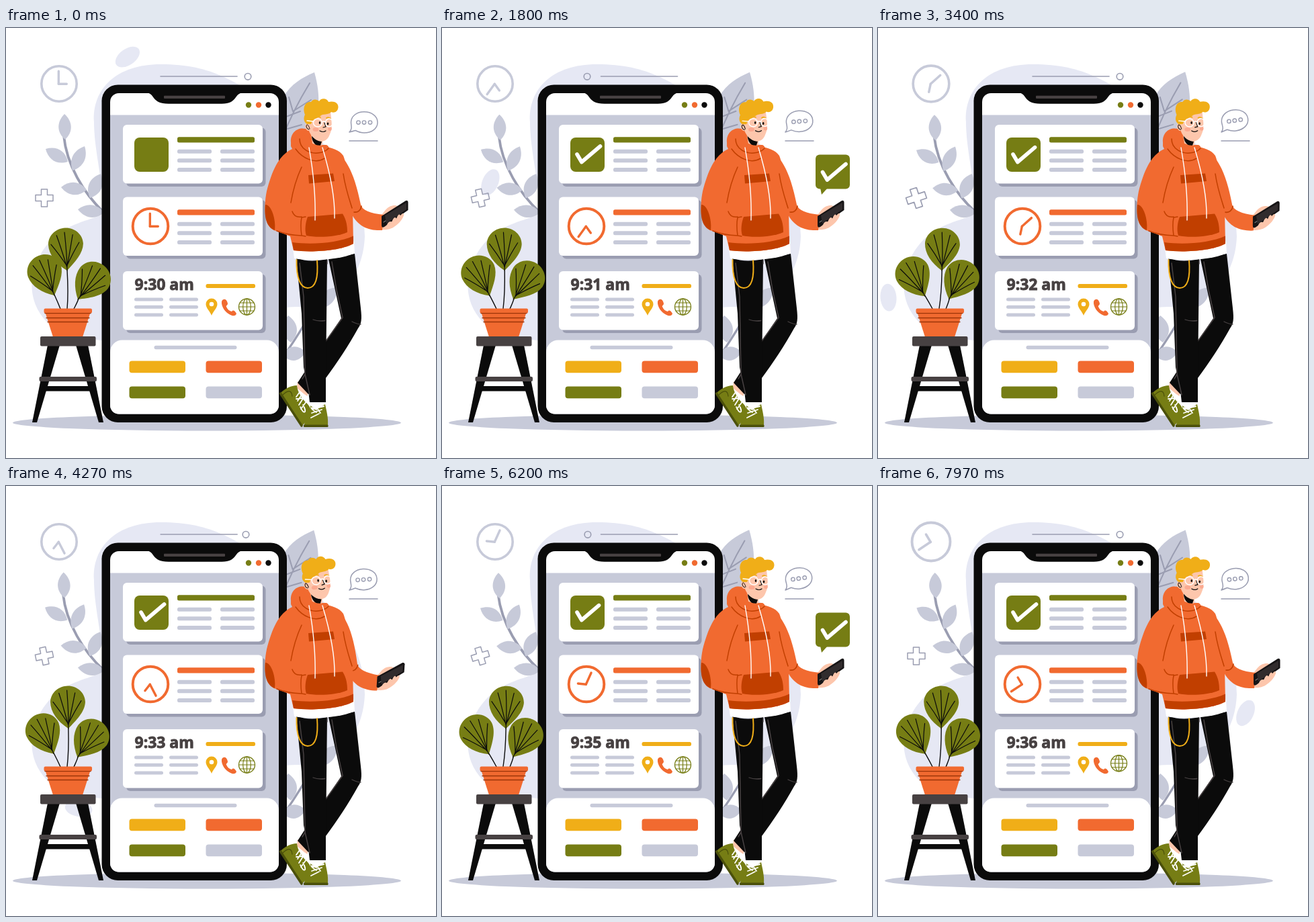
Animation, 640 px wide and 640 px high, one loop 8000 ms. Source, as an HTML page with a canvas:

```html
<!DOCTYPE html>
<html lang="en">
<head>
<meta charset="utf-8">
<title>Appointment app</title>
<style>
html, body { margin: 0; width: 100%; height: 100%; overflow: hidden; background: #fff; }
canvas { display: block; width: 640px; height: 640px; }
</style>
</head>
<body>
<canvas id="stage"></canvas>
<script>
const canvas = document.getElementById('stage');
const ctx = canvas.getContext('2d');
const dpr = window.devicePixelRatio || 1;
canvas.width = canvas.height = 640 * dpr;

const PALE = '#e6e8f4', LILAC = '#c7cad9', STEEL = '#9a9db1', BLACK = '#0b0b0b', GRAY = '#474142',
  OLIVE = '#767d14', MOSS = '#4b500a', ORANGE = '#f16a30', RUST = '#c13f00', YELLOW = '#f0ae18',
  SKIN = '#fdc6ac', WHITE = '#fff';
const LOOP = 8000;

// Drawing helpers
function fill(d, color) { ctx.fillStyle = color; ctx.fill(new Path2D(d)); }
function line(d, color, w) { ctx.strokeStyle = color; ctx.lineWidth = w; ctx.stroke(new Path2D(d)); }
function box(x, y, w, h, r, color) {
  ctx.fillStyle = color; ctx.beginPath(); ctx.roundRect(x, y, w, h, r); ctx.fill();
}
function oval(x, y, rx, ry, deg, color) {
  ctx.fillStyle = color; ctx.beginPath();
  ctx.ellipse(x, y, rx, ry, deg * Math.PI / 180, 0, 7); ctx.fill();
}
function dot(x, y, r, color) { oval(x, y, r, r, 0, color); }
function ring(x, y, rx, ry, color, w) {
  ctx.strokeStyle = color; ctx.lineWidth = w; ctx.beginPath();
  ctx.ellipse(x, y, rx, ry, 0, 0, 7); ctx.stroke();
}
function at(x, y, deg, scale, draw) {
  ctx.save(); ctx.translate(x, y); ctx.rotate(deg * Math.PI / 180); ctx.scale(scale, scale);
  draw(); ctx.restore();
}
function turn(x, y, deg, draw) {
  at(x, y, deg, 1, () => { ctx.translate(-x, -y); draw(); });
}
function leaf(x0, y0, x1, y1, w, color) {
  const len = Math.hypot(x1 - x0, y1 - y0);
  at(x0, y0, Math.atan2(y1 - y0, x1 - x0) * 180 / Math.PI, 1, () =>
    fill(`M0 0C${len * .3} ${-w * .75} ${len * .7} ${-w * .7} ${len} 0C${len * .7} ${w * .7} ${len * .3} ${w * .75} 0 0`, color));
}

// Timing helpers
const clamp = x => Math.min(1, Math.max(0, x));
const ramp = (t, start, span) => clamp((t - start) / span);
const smooth = x => (1 - Math.cos(Math.PI * x)) / 2;
const quart = x => x < .5 ? 8 * x ** 4 : 1 - 8 * (1 - x) ** 4;
const hump = (t, start, span) => Math.sin(Math.PI * ramp(t, start, span));
const hop = (t, start) => { const x = ramp(t, start, 580); return -36 * x * (1 - x); };

// Drifting petal: time, x, y, angle
const drift = [
  [-900, 285, 30, 175], [0, 181, 43, 145], [1000, 114, 146, 93], [2630, 34, 317, 135], [3370, 14, 398, 88],
  [4270, 108, 480, 10], [5430, 255, 486, 0], [6870, 432, 440, -25], [7970, 547, 338, -65], [9000, 570, 220, -90]
];
function driftAt(t) {
  let i = 1;
  while (drift[i + 1][0] <= t) i++;
  const [a, b, c, d] = drift.slice(i - 1, i + 3).concat([drift[drift.length - 1]]);
  const span = c[0] - b[0], u = (t - b[0]) / span;
  return [1, 2, 3].map(k => {
    const m = (c[k] - a[k]) / (c[0] - a[0]) * span;
    const n = (d[k] - b[k]) / (d[0] - b[0]) * span;
    return (2 * u ** 3 - 3 * u * u + 1) * b[k] + (u ** 3 - 2 * u * u + u) * m
      + (3 * u * u - 2 * u ** 3) * c[k] + (u ** 3 - u * u) * n;
  });
}

function clock(x, y, r, w, color, t, scale) {
  at(x, y, 0, scale, () => {
    ring(0, 0, r, r, color, w);
    at(-.7, .3, t * .12, 1, () => line('M0 0V-19', color, 3.4));
    at(-.7, .3, 90 + t * .03, 1, () => line('M0 0V-12', color, 3.4));
  });
}

function check(from, to) {
  if (to <= from) return;
  const len = 52;
  ctx.save();
  ctx.setLineDash([(to - from) * len, 999]);
  ctx.lineDashOffset = -from * len;
  line('M-14 0L-7.2 11.5L20.5 -12', WHITE, 5.6);
  ctx.restore();
}

function backdrop(t, sway) {
  fill('M131 140C128 90 165 54 230 54C310 54 340 80 420 130C500 180 534 250 534 310C532 372 490 418 435 415C380 412 330 470 240 470C160 468 100 465 70 445C30 415 28 360 65 318C90 291 125 286 143 278C152 258 131 190 131 140', PALE);
  const [px, py, pa] = driftAt(t);
  oval(px, py, 20.5, 12, pa, PALE);
  oval(299, 587.5, 289, 12, 0, LILAC);

  const ph = t % 2400;
  clock(79, 83, 26.2, 3.6, LILAC, t, 1 + .1 * hump(ph, 170, 900));

  const x = ramp(ph, 1000, 1400);
  const tilt = ph < 1000 ? -18 * smooth(ramp(ph, 800, 200)) : -18 * (1 - x ** 2.2);
  at(57, 253, tilt, 1 + .13 * hump(ph, 800, 500), () =>
    line('M-4.5 -13H4.5V-4.5H13V4.5H4.5V13H-4.5V4.5H-13V-4.5H-4.5Z', STEEL, 1.5));

  const p = t % 4000;
  const left = quart(ramp(p, 0, 1200)) - quart(ramp(p, 2000, 1200));
  const lx = 230 + 6.5 * left;
  line(`M${lx} 72H${lx + 114}`, STEEL, 1.6);
  ring(360 - 144 * left, 72.3, 4.8, 4.8, STEEL, 1.6);

  turn(143, 275, -1.3 * sway, () => {
    line('M145 274C116 246 90 204 86 160', STEEL, 3.8);
    leaf(88, 166, 87, 128, 17, LILAC);
    leaf(92, 199, 59, 180, 17, LILAC);
    leaf(99, 212, 117, 176, 17, LILAC);
    leaf(120, 241, 82, 237, 17, LILAC);
    leaf(125, 253, 141, 217, 18, LILAC);
    leaf(146, 275, 107, 270, 17, LILAC);
  });
  turn(412, 190, -.9 * sway, () => {
    fill('M459 66C440 74 424 84 414 101C396 132 402 165 412 192C444 178 480 140 459 66', LILAC);
    line('M452 82C438 105 424 130 412 162M421 103L427 124L454 107M417 132L438 124M412 152L440 144', STEEL, 2);
  });
  line('M414 487C428 468 440 448 452 428', STEEL, 3.4);
  leaf(424, 468, 420, 428, 20, LILAC);
  leaf(412, 487, 446, 482, 19, LILAC);
  leaf(462, 418, 494, 386, 18, LILAC);

  line('M511 168H553', STEEL, 1.5);
  turn(511, 155, -8.5 * sway, () => {
    line('M511 155C516 150 513.5 146 513.5 140C514 131 522 124.8 533 124.8C544 124.8 553 131 553 140.5C553 150 544 156 533 156C527 156 523 154 520 152.5Q515 154 511 155Z', STEEL, 1.5);
    for (const cx of [524.5, 533, 542]) ring(cx, 140.6, 2.7, 2.7, STEEL, 1.4);
  });
}

function rows(xs, ys, w, h) {
  for (const x of xs) for (const y of ys) box(x, y - h / 2, w, h, 2.5, LILAC);
}

function device(t) {
  box(142.5, 84.5, 275.5, 502.5, 24, BLACK);
  ctx.save();
  ctx.beginPath(); ctx.roundRect(155, 97, 251, 477.5, 13); ctx.clip();
  box(155, 97, 251, 33, 0, WHITE);
  box(155, 129.5, 251, 450, 0, LILAC);
  box(155, 464.5, 251, 130, [18, 18, 0, 0], WHITE);
  ctx.restore();
  fill('M208 96C223 97 215 112.5 242 112.8H321C346 112.5 338 97 354 96Z', BLACK);
  box(235, 100.7, 91, 4.3, 1, GRAY);
  dot(361, 114.5, 4.2, OLIVE); dot(376, 114.5, 4.2, ORANGE); dot(390.5, 114.5, 4.2, BLACK);

  for (const y of [144, 251.5, 362]) {
    box(179, y + 4.5, 207.5, 87.5, 6, STEEL);
    box(174, y, 208, 87.5, 6, WHITE);
  }

  box(191, 163, 51, 51, 8, OLIVE);
  const ph = t % 2800;
  at(215, 188, 0, 1, () => check(smooth(ramp(ph, 2400, 380)), smooth(ramp(ph, 120, 600))));
  box(255, 162.3, 115, 8.2, 2.5, OLIVE);
  rows([255, 319], [183.7, 197.3, 211], 51, 6);

  clock(215, 295, 26.3, 4, ORANGE, t, 1);
  box(255, 270.3, 115, 8.2, 2.5, ORANGE);
  rows([255, 319], [291.7, 305.3, 319], 51, 6);

  ctx.font = 'bold 23px "Open Sans", sans-serif';
  ctx.fillStyle = ctx.strokeStyle = GRAY;
  ctx.lineWidth = .9;
  for (const [text, x] of [['9:3' + Math.floor(t / 1200), 191.5], ['am', 243.3]]) {
    ctx.fillText(text, x, 390.3);
    ctx.strokeText(text, x, 390.3);
  }
  box(297.5, 381, 73.5, 6, 2.5, YELLOW);
  rows([191, 243], [404, 415.3, 427], 43, 5);

  const wave = t % 2400;
  at(0, hop(wave, 70), 0, 1, () => {
    fill('M306 428C304 422 297.5 417 297.5 411A8.5 8.5 0 0 1 314.5 411C314.5 417 308 422 306 428', YELLOW);
    dot(306, 411, 3.3, WHITE);
  });
  at(0, hop(wave, 150), 0, 1, () =>
    fill('M322 405C326 402 329 405 330 410C330 413 327 413 328 415C330 419 332 421 336 422C338 419 341 421 343 425C342 429 338 429 334 427C327 424 320 415 321 407Z', ORANGE));
  at(358.5, 415 + hop(wave, 230), 0, 1, () => {
    ring(0, 0, 12, 12, OLIVE, 1.3);
    ring(0, 0, 5.8, 12, OLIVE, 1.2);
    line('M0 -12V12M-12 0H12M-10.4 -6H10.4M-10.4 6H10.4', OLIVE, 1.2);
  });

  box(220.5, 472.7, 123, 5.5, 2.7, LILAC);
  box(183.5, 495.5, 83.5, 17.7, 4, YELLOW);
  box(297.5, 495.5, 83.5, 17.7, 4, ORANGE);
  box(183.5, 533.5, 83.5, 17.7, 4, OLIVE);
  box(297.5, 533.5, 83.5, 17.7, 4, LILAC);
}

function fanLeaf(x, y, deg) {
  at(x, y, deg, 1, () => {
    fill('M0 0C-16 -11 -26 -25 -26 -40C-25 -55 -12 -63.5 0 -63.5C14 -63.5 26 -53 26 -39C25 -24 12 -12 0 0', OLIVE);
    line('M0 0C1 -20 0 -40 -1 -57M0 -5C-5 -25 -9 -40 -13 -53M0 -7C-9 -22 -16 -32 -22 -40M0 -5C5 -25 8 -40 11 -53M0 -7C8 -22 14 -32 20 -41', BLACK, 1.2);
  });
}

function potPlant(sway) {
  turn(102, 417, -7 * sway, () => {
    line('M101 418C104 412 107 407 109 400', BLACK, 1.4);
    fanLeaf(107, 404, 37);
  });
  turn(81, 417, -7 * sway, () => {
    line('M81 418Q77 408 72 397', BLACK, 1.4);
    fanLeaf(72, 398, -22);
  });
  turn(91, 417, 4.5 * sway, () => {
    line('M91 418Q93 395 91 360', BLACK, 1.4);
    fanLeaf(91, 361, -3);
  });
  fill('M58 422H126L114 460H70Z', ORANGE);
  box(56.5, 417.5, 71.5, 7, 2, ORANGE);
  line('M58 424.7H126M60 431.5H124M62 437.5H122', '#9b3408', 1.3);

  fill('M62 472H80L46 587H39Z', BLACK);
  fill('M104 472H122L145 587H138Z', BLACK);
  box(58, 533, 68, 7.5, 0, BLACK);
  box(49.5, 519, 85.5, 7, 2, GRAY);
  box(51, 459, 82.5, 14.5, 2, GRAY);
}

function legs() {
  // Rear shoe and ankle
  fill('M434 526L450 541L448 550L433 536Z', SKIN);
  fill('M433 536L444 545L455 552L454 574L441 566Z', WHITE);
  fill('M408 544C414 537 424 532 433 532C434 542 440 550 445 556C452 562 457 570 454 577L440 593Z', OLIVE);
  line('M408.5 544L440 592', MOSS, 3.5);
  line('M412 546C418 540 425 537 426 548', MOSS, 1.2);
  line('M437 542L432 549M440 546L434 555M443 550L436 561M447 556L439 567M432 552L441 551M438 564C443 576 449 573 442 561', WHITE, 1.8);
  fill('M480 344L519 336L528 417C530 434 529 440 524 447C509 474 493 498 476 521L450 545L434 528L447 508L476 466L499 432Z', BLACK);
  line('M485 348L492 390L501 431L476 466L441 522', GRAY, 1.5);
  line('M515 437Q523 441 528 441M482 343L488 342', GRAY, 1.3);

  // Front shoe and leg
  fill('M452 555H475L475 567H453Z', WHITE);
  fill('M444 591C445 580 455 575 453 562L462 568L475 560C477 570 480 580 479 591Z', OLIVE);
  box(443, 590.5, 36.5, 3.5, 1, MOSS);
  line('M456 567L473 563M455 573L470 568M454 580L466 574M461 563L468 573M462 572C452 566 452 562 462 568', WHITE, 1.8);
  fill('M432 342C446 348 462 347 478 344L476 521V557H452L450 540L443 505L440 425Z', BLACK);
  line('M437 350L443 400L445 515L452 546', GRAY, 1.5);
  line('M457 434Q465 437 475 435.5M478 345V351', GRAY, 1.3);
  line('M432.5 345C432 372 438 387 449 387C461 387 465 372 463 346', YELLOW, 2);
}

function arm() {
  fill('M557 281C564 272 567 266 575 264.5C582 263 585 266 582 268L574 273L590 275C593 280 587 287 582 292C575 299 569 301 557 300Z', SKIN);
  fill('M482 180C503 186 518 212 528 263C530 271 542 276 562 278L560 301C540 302 524 296 514 276L498 230Z', ORANGE);
  line('M529 265C528 271 524 275 518 274', RUST, 1.6);
  fill('M559 280L595 257Q598 256 598.5 259V271L563 296Q559 298 559 294Z', '#161415');
  fill('M564 279L596 260V270L566 291Z', '#312c2d');
  line('M562 289L565 287', '#777', 1.2);
  fill('M567 293C570 286 575 288 574 290C576 281 581 280 581 285C583 276 587 276 587 280C589 275 593 275 592 279C589 287 583 293 574 298L564 298Z', SKIN);
}

function head() {
  fill('M453 150L472 164L470 177L456 172Z', SKIN);
  fill('M455 160C460 166 465 168 470 169L467 178C459 174 455 168 455 160', BLACK);
  fill('M450 130L483 124C484 136 487 148 482 158C479 167 473 170 465 168C457 165 452 158 450 150Z', SKIN);
  oval(449.5, 147, 4.2, 6, -12, SKIN);
  line('M452 150C450 143 447 142 447 147Q448 151 451 151', BLACK, 1);
  oval(461, 151, 4.5, 3, 0, '#fba990');
  oval(482, 150, 2.8, 3, 0, '#fba990');
  fill('M448 143C442 139 443 133 445 129C441 119 445 109 454 110C457 105 463 106 466 109C470 103 478 105 480 110C488 108 495 111 494.5 118C494 125 488 127 484 125C480 130 471 127 468 131C463 134 457 134 454 143Z', YELLOW);
  line('M461 134Q464 131 468 133M477 134Q480 132 483 135', YELLOW, 1.8);
  oval(467, 141, 1.3, 2, 0, BLACK); oval(479, 142.5, 1.3, 2, 0, BLACK);
  line('M474 141L476 147L472 148M467 153Q472 156 476 153', BLACK, 1.2);
  ring(464, 141, 6.5, 6, WHITE, 1.4);
  ring(481, 141, 5.5, 6, WHITE, 1.4);
  line('M470.5 140Q473 138 475.5 140M457.5 139L448 138', WHITE, 1.4);
}

function person(t) {
  const p = t % 3000;
  const reach = smooth(ramp(p, 250, 570)) - smooth(ramp(p, 1260, 430));
  const nod = smooth(ramp(p, 250, 570)) - smooth(ramp(p, 1260, 900));

  legs();
  fill('M427 328L518 318L519 335C495 346 452 347 429 343Z', WHITE);
  turn(505, 190, 4 * reach, arm);
  fill('M424 176C424 156 436 145 450 152L472 176C484 178 496 181 502 190C509 208 512 240 516 270L517 321C495 333 450 334 428 331L423 310L402 302C384 298 383 268 388 243C396 213 405 190 426 180Z', ORANGE);
  fill('M386 263C394 262 402 283 400 301C389 297 384 285 386 263', RUST);
  fill('M426 319C455 323 494 320 517 309.5V321C495 333 450 334 428 331Z', RUST);
  fill('M449 281L501 276.5C507 286 508 296 508 304C490 312 460 312 447 309C444 300 446 289 449 281', RUST);
  line('M446 281L440 282C438 292 439 302 440 309L446 310M440 281C433 282 428 279 426 273M403 302Q418 308 440 309', RUST, 1.5);
  line('M440 207C433 222 427 242 424 260M502 217C505 238 510 252 515 268', RUST, 1.5);
  fill('M450 219L487 216.5L489 228L451 231.5Z', RUST);

  // Hood around the neck
  fill('M424 170C423 153 438 145 451 152C451 166 460 175 477 174C484 177 481 189 473 195C459 201 425 190 424 170', ORANGE);
  line('M437 165C437 181 453 187 464 186Q475 185 480 179M431 180C441 194 460 203 474 194', RUST, 1.5);
  turn(462, 175, -4 * nod, head);
  fill('M443 157C448 170 460 177 475 174L477 181C462 186 444 178 439 164Z', ORANGE);
  line('M451 178C457 212 461 252 460 286M471 178C480 208 490 248 489 283', WHITE, 1.4);
}

function notice(t) {
  const p = t % 4000;
  const size = smooth(ramp(p, 680, 360)) - smooth(ramp(p, 2900, 380));
  if (size < .01) return;
  at(566, 247, 0, size, () => {
    box(-10, -58.5, 51, 51, 6, OLIVE);
    fill('M-3 -9L-1 1L8 -9Z', OLIVE);
    ctx.translate(14.5, -32.5);
    check(0, 1);
  });
}

function draw(t) {
  const sway = (1 - Math.cos(t / 2400 * 2 * Math.PI)) / 2;
  ctx.setTransform(dpr, 0, 0, dpr, 0, 0);
  ctx.lineCap = ctx.lineJoin = 'round';
  box(0, 0, 640, 640, 0, WHITE);
  backdrop(t, sway);
  device(t);
  potPlant(sway);
  person(t);
  notice(t);
}

const start = performance.now();
function tick() {
  draw((performance.now() - start) % LOOP);
  requestAnimationFrame(tick);
}
tick();
</script>
</body>
</html>
```
